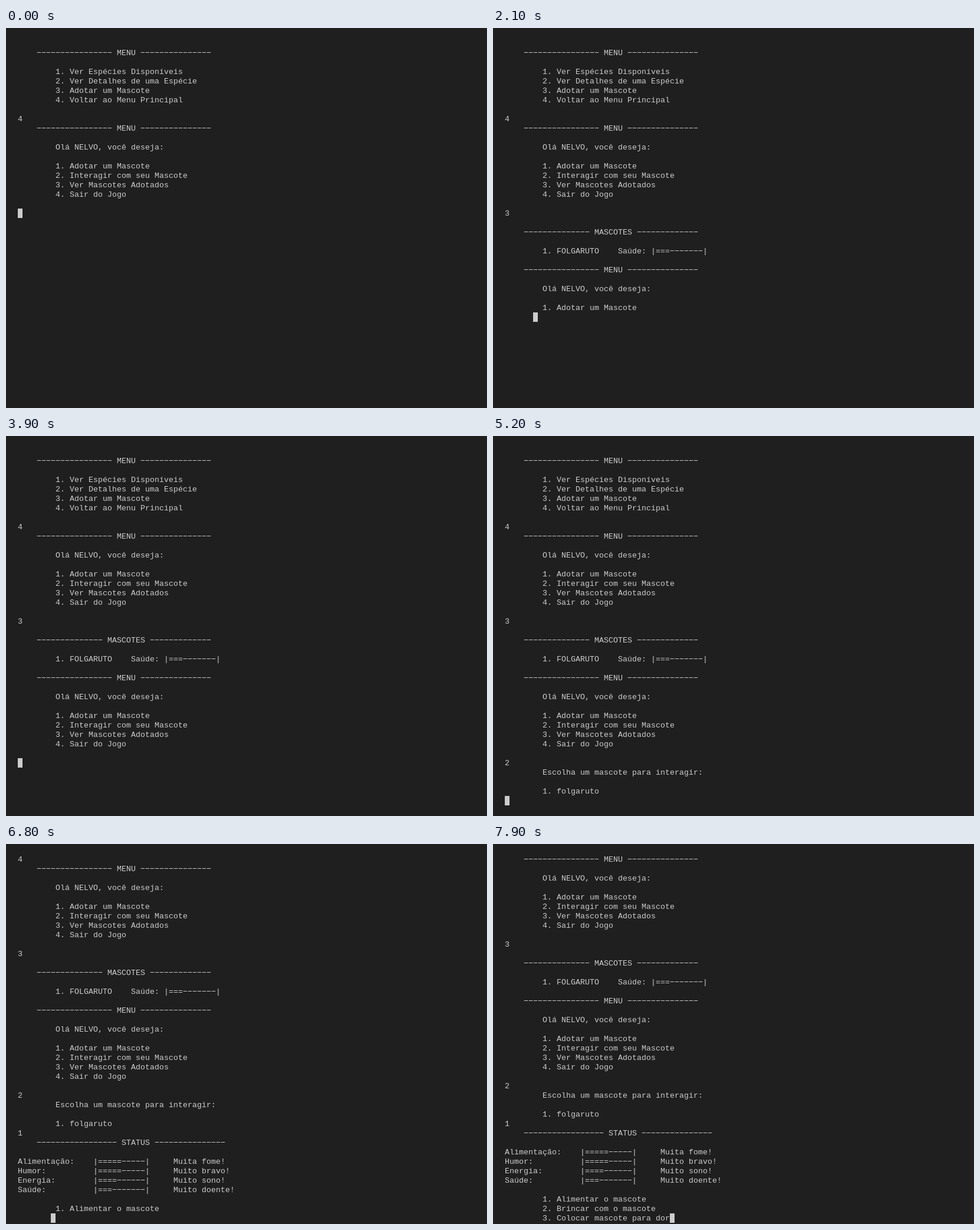
These frames come from a looping animation (816 px wide and 644 px high, 8000 ms). An HTML page:

```html
<!DOCTYPE html>
<html lang="pt">
<head>
<meta charset="utf-8">
<title>Terminal</title>
<style>
  html, body { margin: 0; width: 100%; height: 100%; overflow: hidden; background: #1f1f1f; }
  #screen { position: absolute; left: 0; top: 18px; width: 816px; height: 626px; overflow: hidden; }
  #text, #cursor {
    position: absolute; margin: 0; white-space: pre; color: #ccc;
    font: 13.333px/16px "Liberation Mono", "Courier New", monospace;
    font-variant-ligatures: none;
  }
  #text { left: 20px; top: 1px; }
  #cursor { width: 8px; height: 16px; line-height: 18px; background: #ccc; color: #1f1f1f; }
</style>
</head>
<body>
<div id="screen"><pre id="text"></pre><div id="cursor"></div></div>
<script>
const LOOP = 8000, TICK = 100, CELL = 8, ROW = 16, LEFT = 20, LAST_ROW = 39;
const DASH = '\u2212'; // wide enough to read as a terminal rule

const rule = (left, title, right) =>
  '    ' + DASH.repeat(left) + ' ' + title + ' ' + DASH.repeat(right);
const item = text => ' '.repeat(8) + text;
const list = (...names) => names.map((name, i) => item(`${i + 1}. ${name}`));
const bar = full => '|' + '='.repeat(full) + DASH.repeat(10 - full) + '|';
const stat = (name, full, mood) => name.padEnd(16) + bar(full) + '     ' + mood;

const menu = rule(16, 'MENU', 15);
const mainMenu = [
  menu, '', item('Olá NELVO, você deseja: '), '',
  ...list('Adotar um Mascote', 'Interagir com seu Mascote', 'Ver Mascotes Adotados', 'Sair do Jogo'), ''
];

const lines = [
  '', '', menu, '',
  ...list('Ver Espécies Disponíveis', 'Ver Detalhes de uma Espécie', 'Adotar um Mascote', 'Voltar ao Menu Principal'),
  '', '4', ...mainMenu,
  '3', '', rule(14, 'MASCOTES', 13), '',
  item('1. FOLGARUTO    Saúde: ' + bar(3)), '', ...mainMenu,
  '2', item('Escolha um mascote para interagir:'), '', item('1. folgaruto'),
  '1', rule(17, 'STATUS', 15), '',
  stat('Alimentação:', 5, 'Muita fome!'),
  stat('Humor:', 5, 'Muito bravo!'),
  stat('Energia:', 4, 'Muito sono!'),
  stat('Saúde:', 3, 'Muito doente!') + '\r', '',
  ...list('Alimentar o mascote', 'Brincar com o mascote', 'Colocar mascote para dormir')
];
const stream = lines.join('\n');
const offset = (row, col) => lines.slice(0, row).reduce((n, line) => n + line.length + 1, col);

// [tick, row, column, typed steadily until the next step]
const TYPE = true;
const steps = [
  [0, 19, 0], [5, 19, 1], [6, 27, 3], [7, 27, 3, TYPE],
  [13, 27, 24], [14, 27, 32], [15, 29, 3], [16, 29, 9], [17, 29, 9, TYPE],
  [20, 30, 0, TYPE], [26, 30, 36], [28, 31, 4, TYPE], [34, 32, 3, TYPE],
  [36, 32, 16], [38, 32, 22], [39, 34, 0], [44, 34, 1],
  [45, 35, 6, TYPE], [50, 35, 37], [52, 38, 0],
  [62, 44, 47], [63, 46, 6, TYPE], [68, 47, 7], [69, 47, 13],
  [70, 47, 13, TYPE], [79, 48, 35]
].map(([tick, row, col, typed]) => ({ tick, count: offset(row, col), typed }));

function charsAt(tick) {
  const i = steps.findLastIndex(step => step.tick <= tick);
  const { tick: start, count, typed } = steps[i];
  if (!typed) return count;
  const next = steps[i + 1];
  return Math.round(count + (next.count - count) * (tick - start) / (next.tick - start));
}

const text = document.getElementById('text');
const cursor = document.getElementById('cursor');
let drawn = -1;

function draw(tick) {
  const shown = stream.slice(0, charsAt(tick));
  const rows = shown.split('\n');
  const row = rows.length - 1;
  const last = rows[row];
  const col = last.endsWith('\r') ? 0 : last.length;
  const top = 1 + Math.max(0, row - LAST_ROW); // the first row stays empty
  text.textContent = rows.slice(top).join('\n').replaceAll('\r', '');
  cursor.textContent = last[col] || '';
  cursor.style.left = LEFT + col * CELL + 'px';
  cursor.style.top = (row - top) * ROW + 'px';
}

function frame() {
  const tick = Math.floor(performance.now() % LOOP / TICK);
  if (tick !== drawn) draw(drawn = tick);
  requestAnimationFrame(frame);
}
frame();
</script>
</body>
</html>
```
